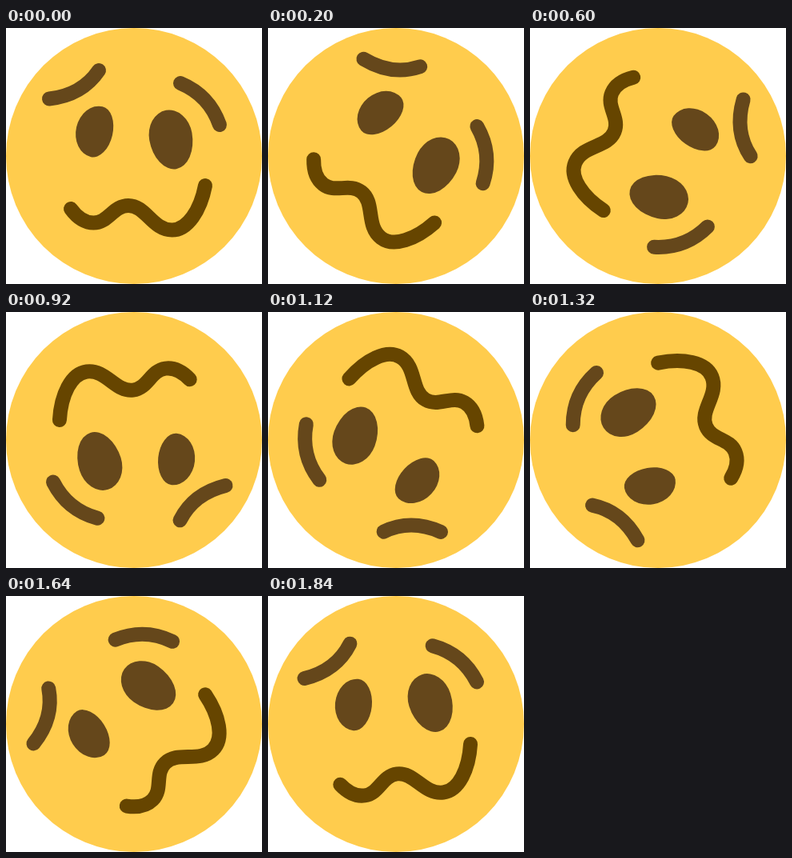
Recreate the animation shown at these times as an HTML page with a canvas. Size 320 px wide and 320 px high, loop 1880 ms.

```html
<!DOCTYPE html>
<html lang="en">
<head>
<meta charset="utf-8">
<title>Spinning woozy face</title>
<style>
  html, body { margin: 0; width: 100%; height: 100%; overflow: hidden; background: #fff; }
  canvas { display: block; width: 320px; height: 320px; }
</style>
</head>
<body>
<canvas id="stage" width="320" height="320"></canvas>
<script>
const ctx = document.getElementById('stage').getContext('2d');
const LOOP = 1880, STEP = 40, TURN = 7.5, SKIP_AT = 37;
const RAD = Math.PI / 180;
const YELLOW = '#ffcc4d', BROWN = '#65471b', MOUTH = '#664500';

const brows = [
  new Path2D('M54 88.5Q95 84 116 53'),
  new Path2D('M218 69Q254 84 267 121')
];
const mouth = new Path2D(
  'M81 226C89 237 98 243.5 109.5 243.5C128 243.5 134 222 153 222' +
  'C175 222 183 252.5 207.5 252.5C227 252.5 243 228 249 197');

// Four quarter ellipses meeting around an off-centre core (dx, dy).
function egg(x, y, rx, ry, tilt, dx, dy) {
  ctx.save();
  ctx.translate(x, y);
  ctx.rotate(tilt * RAD);
  ctx.beginPath();
  for (let q = 0; q < 4; q++) {
    const w = q === 0 || q === 3 ? rx - dx : rx + dx;
    const h = q < 2 ? ry - dy : ry + dy;
    ctx.ellipse(dx, dy, w, h, 0, q * Math.PI / 2, (q + 1) * Math.PI / 2);
  }
  ctx.fillStyle = BROWN;
  ctx.fill();
  ctx.restore();
}

function line(path, color) {
  ctx.strokeStyle = color;
  ctx.stroke(path);
}

// The spin moves in even steps, with one double step late in the loop.
function angleAt(time) {
  const n = Math.floor((time % LOOP) / STEP);
  return (n + (n >= SKIP_AT ? 1 : 0)) * TURN * RAD;
}

function draw(time) {
  ctx.setTransform(1, 0, 0, 1, 0, 0);
  ctx.fillStyle = '#fff';
  ctx.fillRect(0, 0, 320, 320);
  ctx.fillStyle = YELLOW;
  ctx.beginPath();
  ctx.arc(160, 160, 160, 0, 2 * Math.PI);
  ctx.fill();

  ctx.translate(160, 160);
  ctx.rotate(angleAt(time));
  ctx.translate(-160, -160);
  ctx.lineWidth = 18;
  ctx.lineCap = 'round';
  egg(110.5, 129, 23, 32.3, 13, 3, 0);
  egg(206.5, 139.5, 27, 37.2, -10, 0, -4);
  brows.forEach(b => line(b, BROWN));
  line(mouth, MOUTH);
}

const start = performance.now();
function tick() {
  draw(performance.now() - start);
  requestAnimationFrame(tick);
}
draw(0);
requestAnimationFrame(tick);
</script>
</body>
</html>
```
